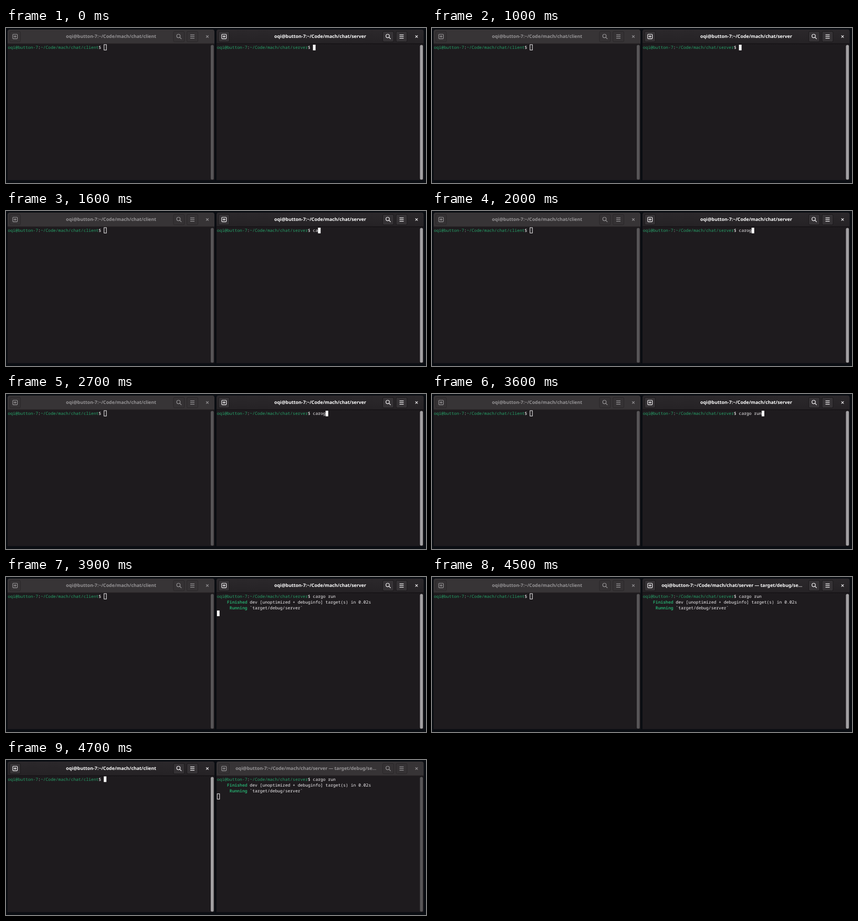
An HTML page for the animation above (5000 ms loop, 800x297 px).

```html
<!DOCTYPE html>
<html lang="en">
<head>
<meta charset="utf-8">
<title>Two terminals</title>
<style>
  html, body { margin: 0; width: 100%; height: 100%; overflow: hidden; background: #0a0d12; }
  svg { display: block; width: 800px; height: 297px; }
  text { white-space: pre; text-rendering: geometricPrecision; }
  .title { font: 700 8.8px "Noto Sans", "Open Sans", sans-serif; text-anchor: middle; }
  .mono { font: 400 8.02px "Noto Sans Mono", "DejaVu Sans Mono", monospace; fill: #f4f2f4; }
  .green { fill: #26a269; }
  .bold { font-weight: 700; }
  .body { fill: #1e1b1e; }
  .icon { fill: none; stroke-width: 1.2; }

  .win .head { fill: #373436; }
  .win .edge { fill: #232022; }
  .win .btn { fill: #353234; stroke: #2a2729; }
  .win .title { fill: #959395; }
  .win .icon { stroke: #959395; }
  .win .bar { fill: #575557; }
  .win .cursor { fill: none; stroke: #f4f2f4; stroke-width: 1; }

  .win.on .head { fill: url(#headOn); }
  .win.on .edge { fill: #0f0d0f; }
  .win.on .btn { fill: #353235; stroke: #1a181a; }
  .win.on .title { fill: #fff; }
  .win.on .icon { stroke: #f0eef0; }
  .win.on .bar { fill: #a3a1a3; }
  .win.on .cursor { fill: #fff; stroke: none; }
</style>
</head>
<body>
<svg viewBox="0 0 800 297">
  <defs>
    <linearGradient id="headOn" x1="0" y1="0" x2="0" y2="1">
      <stop offset="0" stop-color="#2b282b"/>
      <stop offset="1" stop-color="#252225"/>
    </linearGradient>
  </defs>
  <g id="client" class="win"></g>
  <g id="server" class="win"></g>
</svg>
<script>
const LOOP = 5000, CHAR = 4.812, LINE = 10.75, PROMPT = 38;
const HOST = 'oqi@button-7', ROOT = '~/Code/mach/chat/';

// [time, text typed after the server prompt]
const TYPED = [
  [0, ''], [1600, 'ca'], [1800, 'car'], [1900, 'caro'], [2000, 'carog'],
  [2100, 'carog '], [2300, 'carog r'], [2500, 'carog '], [2700, 'carog'],
  [2800, 'caro'], [2900, 'car'], [3100, 'carg'], [3200, 'cargo'],
  [3300, 'cargo '], [3400, 'cargo r'], [3500, 'cargo ru'], [3600, 'cargo run']
];
const BLINK = [[0, true], [400, false], [1000, true], [4500, false], [4700, true]];
const RUN = 3900, RETITLE = 4100, SWITCH = 4700;

const at = (steps, t) => steps.filter(s => s[0] <= t).pop()[1];

function makeWindow(id, x, right, textX, top) {
  const el = document.getElementById(id);
  const line = (row, html, cls = '') =>
    `<text class="mono ${cls}" x="${textX}" y="${top + 8.2 + row * LINE}">${html}</text>`;
  const button = (bx, w) =>
    `<rect class="btn" x="${bx}" y="6.5" width="${w}" height="20" rx="2.5"/>`;
  const search = right - 67.5, menu = right - 42, close = right - 13.5;

  el.innerHTML = `
    <path class="head" d="M${x} 31V7q0-4 4-4H${right - 4}q4 0 4 4V31z"/>
    <rect class="body" x="${x}" y="30" width="${right - x}" height="261.5"/>
    <rect class="edge" x="${x}" y="29.6" width="${right - x}" height="1"/>
    ${button(x + 4, 20.5)}${button(search - 10.5, 21)}${button(menu - 10.5, 21)}
    <rect class="icon" x="${x + 10}" y="12" width="8.6" height="8.6" rx="1"/>
    <path class="icon" d="M${x + 11.8} 16.3h5M${x + 14.3} 13.8v5"/>
    <circle class="icon" cx="${search - 1}" cy="15.3" r="3.3"/>
    <path class="icon" d="M${search + 1.5} 17.8l3.2 3.2"/>
    <path class="icon" d="M${menu - 4} 13.2h8M${menu - 4} 16.4h8M${menu - 4} 19.6h8"/>
    <path class="icon" d="M${close - 2.3} 14.1l4.6 4.6m0-4.6l-4.6 4.6"/>
    <text class="title" y="19.4"></text>
    <rect class="bar" x="${right - 7}" y="32.5" width="5.6" height="258" rx="2.6"/>
    ${line(0, `<tspan class="green">${HOST}</tspan>:<tspan class="green">${ROOT}${id}</tspan>$ <tspan class="typed"></tspan>`)}
    <g class="output" visibility="hidden">
      ${line(1, '    <tspan class="green bold">Finished</tspan> dev [unoptimized + debuginfo] target(s) in 0.02s')}
      ${line(2, '     <tspan class="green bold">Running</tspan> `target/debug/server`')}
    </g>
    <rect class="cursor"/>`;

  const get = cls => el.querySelector('.' + cls);
  const title = get('title'), typed = get('typed'), output = get('output'), cursor = get('cursor');
  const set = (node, attrs) => { for (const k in attrs) node.setAttribute(k, attrs[k]); };

  return s => {
    el.classList.toggle('on', s.focus);
    title.textContent = `${HOST}:${ROOT}${id}${s.suffix}`;
    set(title, { x: s.titleX });
    typed.textContent = s.text;
    set(output, { visibility: s.output ? 'visible' : 'hidden' });
    const inset = s.focus ? 0 : 0.5;
    set(cursor, {
      x: textX + s.col * CHAR + inset,
      y: top + s.row * LINE + inset,
      width: 5 - inset,
      height: 10.8 - inset,
      visibility: s.cursor ? 'visible' : 'hidden'
    });
  };
}

const client = makeWindow('client', 3, 397, 3.4, 31.4);
const server = makeWindow('server', 401, 795.5, 401.8, 32);

function draw(t) {
  const text = at(TYPED, t), ran = t >= RUN, long = t >= RETITLE, left = t >= SWITCH;
  client({
    focus: left, suffix: '', titleX: 200.2, text: '', output: false,
    col: PROMPT, row: 0, cursor: true
  });
  server({
    focus: !left, suffix: long ? ' — target/debug/se…' : '', titleX: long ? 571.2 : 598.5,
    text, output: ran, col: ran ? 0 : PROMPT + text.length, row: ran ? 3 : 0,
    cursor: at(BLINK, t)
  });
}

const start = performance.now();
function tick() {
  draw((performance.now() - start) % LOOP);
  requestAnimationFrame(tick);
}
tick();
</script>
</body>
</html>
```
